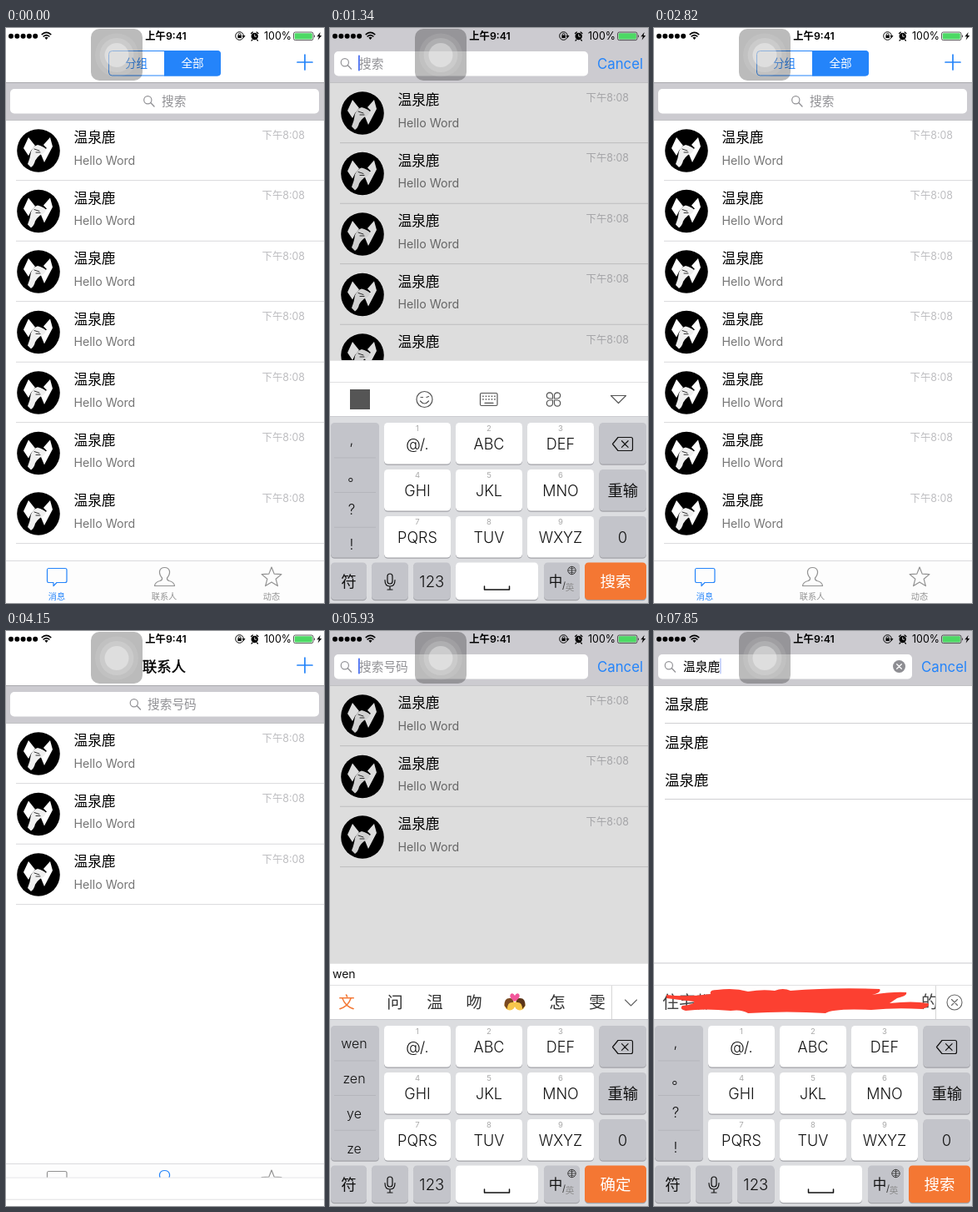
Animation of 382x689 px, one loop 8 s. Source, as an HTML page:

```html
<!DOCTYPE html>
<html lang="zh-CN">
<head>
<meta charset="utf-8">
<title>Search demo</title>
<style>
html, body { margin: 0; width: 100%; height: 100%; overflow: hidden; background: #fff; }
svg { display: block; width: 100vw; height: 100vh; font-family: Inter, "Noto Sans CJK SC", "Noto Sans CJK", sans-serif; }
</style>
</head>
<body>
<svg id="stage" viewBox="0 0 382 689"></svg>
<script>
const LOOP = 8000, TICK = LOOP / 54;
const BLUE = '#2484fa', ORANGE = '#f47733', BAR = '#cccbd0', HINT = '#929296';
const NAME = '温泉鹿';
const KEYBOARD_HEIGHT = 291;
const SLIDE = 296, SLIDE_DELAY = 34, HINT_SLIDE = 230;
const CONTACTS_AT = 3400, COMMIT_AT = 7250;

const searches = [
  { open: 473, close: 1367, caret: 950 },
  { open: 4116, close: Infinity, caret: 4600 }
];
const SIDE = ['wen', 'zen', 'ye', 'ze'];
const WORDS = ['文', '问', '温', '吻', '', '怎', '雯'];
const typing = [
  { at: 4880, pinyin: 'w', side: ['w', 'x', 'y', 'z'], words: ['我', '在', '要', '一', '下', '想', '这'] },
  { at: 5180, pinyin: 'we', side: ['ye', 'ze', 'xe', 'we'], words: ['也', '夜', '则', '叶', '业', '页', '野'] },
  { at: 5620, pinyin: 'wen', side: SIDE, words: WORDS },
  ...["wen'q", "wen'qu", "wen'qua", "wen'quan", "wen'quan'l", "wen'quan'lu"].map((pinyin, i) =>
    ({ at: 6360 + i * TICK, pinyin, side: SIDE, words: ['温', '文', '问', '吻', '闻', '怎', '雯'] }))
];

const clamp = v => Math.max(0, Math.min(1, v));
const mix = (a, b, p) => a + (b - a) * p;
const smooth = v => { v = clamp(v); return v * v * (3 - 2 * v); };
// Critically damped spring, as used by the system keyboard.
const spring = ms => { const x = Math.max(0, ms) * 0.01826; return 1 - (1 + x) * Math.exp(-x); };

const rect = (x, y, w, h, fill, r = 0, more = '') =>
  `<rect x="${x}" y="${y}" width="${w}" height="${h}" rx="${r}" fill="${fill}" ${more}/>`;
const circle = (x, y, r, fill, more = '') => `<circle cx="${x}" cy="${y}" r="${r}" fill="${fill}" ${more}/>`;
const fillPath = (d, fill) => `<path d="${d}" fill="${fill}"/>`;
const line = (d, color, width = 1) =>
  `<path d="${d}" fill="none" stroke="${color}" stroke-width="${width}" stroke-linecap="round" stroke-linejoin="round"/>`;
const text = (x, cy, str, size, fill = '#000', anchor = 'middle', weight = 400) =>
  `<text x="${x}" y="${cy + size * 0.36}" font-size="${size}" fill="${fill}" text-anchor="${anchor}" font-weight="${weight}">${str}</text>`;
const group = (x, y, body, more = '') => `<g transform="translate(${x} ${y})" ${more}>${body}</g>`;

function statusBar() {
  let s = '';
  for (let i = 0; i < 5; i++) s += circle(6 + i * 7.3, 9.8, 3, '#000');
  s += line('M43.2 7.6Q48.5 3.2 53.8 7.6M45.2 9.9Q48.5 7.2 51.8 9.9', '#000', 1.6) + fillPath('M46.4 11.6Q48.5 10 50.6 11.6L48.5 14Z', '#000');
  s += text(192, 9.6, '上午9:41', 12.3, '#000', 'middle', 600);
  s += circle(280.5, 9.5, 4.8, 'none', 'stroke="#000"') + rect(278.4, 8.6, 4.4, 3.4, '#000') + line('M279.2 8.5V7.2Q280.6 5.6 282 7.2V8.5', '#000', 0.8) + fillPath('M283.5 9h4l-2 3z', '#000');
  s += circle(298.7, 10, 4.2, '#000') + line('M294.5 6.6L296.3 5M302.9 6.6L301.1 5M295.8 14.2L295 15M301.6 14.2L302.4 15', '#000', 1.3) + line('M298.7 7.8V10.2H300.6', '#fff', 0.8);
  s += text(326.5, 9.8, '100%', 12.4);
  s += rect(345.5, 5, 23.5, 9.6, 'none', 2, 'stroke="#333" stroke-width=".8"') + rect(346.7, 6.2, 21.1, 7.2, '#4cd964', 1) + fillPath('M370 8Q372 9.8 370 11.6Z', '#333');
  return s + fillPath('M377.6 5L373.4 10.3H375.9L374.6 14.5L379.2 8.9H376.6Z', '#000');
}

function assistiveButton() {
  return rect(102, 1, 62, 62, 'rgba(0,0,0,.265)', 10) +
    [[26, .09], [20.5, .16], [14.5, .36]].map(([r, a]) => circle(133, 32.5, r, `rgba(255,255,255,${a})`)).join('');
}

function navBar(contacts, shift, alpha) {
  let s = rect(0, -10, 382, 76, '#fff') + rect(0, 65, 382, 1, '#a9a9ad');
  if (contacts) s += `<g stroke="#000" stroke-width=".4">${text(190, 42.5, '联系人', 17.3)}</g>`;
  else s += rect(123.5, 27.5, 134, 29.5, '#fff', 4, `stroke="${BLUE}"`) +
    fillPath('M190 27H254Q258 27 258 31V53.5Q258 57.5 254 57.5H190Z', BLUE) +
    text(156.5, 42.3, '分组', 13.6, BLUE) + text(224, 42.3, '全部', 13.6, '#fff');
  s += line('M350 41H368M359 32V50', BLUE, 1.7);
  return group(0, -shift, s, `opacity="${alpha}"`);
}

function avatar() {
  return circle(0, 0, 25.8, '#000') +
    fillPath('M-18 -3L-12 -16L-4 -6L-9 0L-12 6Z', '#fff') +
    fillPath('M14 -16L17 -5L7 14L2 2L10 -3L6 -7Z', '#fff') +
    fillPath('M-9 1Q-6 -6 -1 -7Q6 -5 9 -2Q8 3 2 5Q-2 8 -4 12Q-5 17 -9 20L-13 16Q-10 9 -9 1Z', '#f0f0f0') +
    line('M-5 -2L1 0M-3 2L2 2', '#333', 1);
}

function messageRows(count, shift) {
  let s = '';
  for (let i = 0; i < count; i++) {
    s += group(0, 110.5 + i * 72.5 - shift,
      group(39, 36.5, avatar()) + text(81.5, 20.7, NAME, 16.7, '#000', 'start') +
      text(81.5, 48, 'Hello Word', 14.2, '#757575', 'start') +
      text(359, 17.8, '下午8:08', 12.4, '#bdbdc0', 'end') +
      (i === 5 ? '' : rect(12, 71.8, 370, 0.8, '#cfcfd2')));
  }
  return s;
}

const resultRows = () => rect(0, 66, 382, 332, '#fff') + rect(0, 397, 382, 1, '#e2e2e4') +
  [0, 1, 2].map(i => text(13, 88 + i * 45.5, NAME, 17.5, '#000', 'start') +
    (i === 1 ? '' : rect(13, 110 + i * 45.5, 369, 1, '#d0d0d3'))).join('');

function searchBar(p, hint, shift, contacts, committed, caret) {
  const width = mix(371, 305, p), y = 87.5 - shift;
  // At rest the hint sits in the middle of the field; active, it sits at the left.
  const middle = 5 + width / 2;
  const iconX = mix(middle - (contacts ? 35.5 : 19), 19, hint), textX = mix(middle - (contacts ? 20.5 : 3.5), 35, hint);
  let s = rect(0, 0, 382, 110.5 - shift, BAR) + rect(0, 110 - shift, 382, 0.8, '#b9b9bd');
  s += rect(5, y - 14.5, width, 29.5, '#fff', 5);
  s += circle(iconX - 1.2, y - 1.3, 4.6, 'none', `stroke="${HINT}" stroke-width="1.2"`) + line(`M${iconX + 2.2} ${y + 2.1}L${iconX + 6.5} ${y + 6.4}`, HINT, 1.4);
  s += committed ? text(35, y, NAME, 14.7, '#000', 'start')
    : text(textX, y, contacts ? '搜索号码' : '搜索', 14.7, HINT, 'start');
  if (committed) s += circle(294.5, y, 7.5, '#8e8e93') + line(`M291.7 ${y - 2.8}l5.6 5.6m0 -5.6l-5.6 5.6`, '#fff', 1.3);
  if (caret) s += rect(committed ? 79 : 34, y - 10, 1.8, 19, '#4a6ff0', 0.8, `opacity="${caret}"`);
  return s + text(mix(394, 321, p), y, 'Cancel', 16.8, BLUE, 'start');
}

function tabBar(contacts) {
  const tint = i => i === (contacts ? 1 : 0) ? BLUE : '#929292';
  let star = '';
  for (let i = 0; i < 10; i++) {
    const a = i * Math.PI / 5 - Math.PI / 2, r = i % 2 ? 5.4 : 12.5;
    star += `${i ? 'L' : 'M'}${319 + r * Math.cos(a)} ${658.5 + r * Math.sin(a)}`;
  }
  return rect(0, 638, 382, 51, '#fdfdfd') + rect(0, 638, 382, 0.8, '#d4d4d6') +
    line('M51 647.5H71Q73 647.5 73 649.5V662.5Q73 664.5 71 664.5H61L57 668.5V664.5H51Q49.5 664.5 49.5 662.5V649.5Q49.5 647.5 51 647.5Z', tint(0), 1.2) +
    line('M187.5 659Q184 655 184.5 651Q185.5 646.5 190.5 646.5Q195.5 646.5 196.5 651Q197 655 193.5 659Q193 661.5 196 662.5Q202 664 202.5 668.5H178.5Q179 664 185 662.5Q188 661.5 187.5 659Z', tint(1), 1.2) +
    line(star + 'Z', tint(2), 1.2) +
    ['消息', '联系人', '动态'].map((label, i) => text([61, 190, 319][i], 681.5, label, 10.2, tint(i))).join('');
}

function toolbar() {
  const ink = '#555';
  let s = rect(24, 433, 24, 24, ink);
  s += circle(113.5, 445, 9.5, 'none', `stroke="${ink}" stroke-width="1.2"`) + line('M108.5 447Q113.5 453 118.5 447M109 442.5H111.5M116 442.5L118.5 441.5', ink, 1.2);
  s += rect(180.5, 437.5, 20.5, 15, 'none', 1.5, `stroke="${ink}" stroke-width="1.2"`) + line('M186 449.3H196', ink, 1.3);
  for (let i = 0; i < 10; i++) s += rect(183.2 + i % 5 * 3.5, 440.6 + (i > 4 ? 3.6 : 0), 1.5, 1.5, ink);
  for (const a of [0, 90, 180, 270])
    s += `<g transform="rotate(${a} 268.5 445)">${line('M267.5 444H263.5Q260.3 443.6 260.3 440.3Q260.6 437 263.8 436.8Q267.2 437 267.5 440.3Z', ink, 1.2)}</g>`;
  return s + line('M337.5 440.5H355.5L346.5 449.5Z', ink, 1.2);
}

const kissIcon = () => group(222, 445,
  circle(-6, 3, 6.5, '#f7c64b') + circle(6, 3, 6.5, '#f7c64b') +
  fillPath('M-12.5 4Q-13 -6 -5 -5Q-1 -4 -2 0Q-9 -1 -9 8Z', '#7a4a22') +
  fillPath('M12.5 4Q13 -6 5 -5Q1 -4 2 0Q9 -1 9 8Z', '#5b3519') +
  fillPath('M0 -1Q-8 -6 -5 -10Q-2 -12 0 -8Q2 -12 5 -10Q8 -6 0 -1Z', '#f2569b'));

function candidates(stage) {
  return text(3, 411, stage.pinyin, 14, '#111', 'start') +
    stage.words.map((word, i) => word ? text([20, 78, 126, 173, 222, 273, 321][i], 445, word, 19.5, i ? '#333' : ORANGE) : kissIcon()).join('') +
    rect(338, 425, 0.8, 40, '#ccc') + line('M354.5 442L361.5 449L368.5 442', '#666', 1.1);
}

function suggestions() {
  return text(10, 445, '住宅都', 20, '#444', 'start') + text(331, 445, '的', 20, '#444') +
    rect(339, 425, 43, 40, '#fff') + rect(338, 425, 0.8, 40, '#ccc') +
    circle(361, 445, 9, 'none', 'stroke="#666" stroke-width="1.1"') + line('M357.5 441.5l7 7m0 -7l-7 7', '#666', 1.1) +
    fillPath('M15 436Q40 439 68 435Q66 430 76 430Q96 427 113 432Q130 429 145 431Q155 427 164 431Q215 427 271 429Q274 433 262 436Q286 432 303 433Q305 437 292 440L283 446Q310 443 329 446Q333 450 322 453Q290 451 261 454Q215 452 206 458Q160 455 113 458Q105 453 92 455Q60 452 38 455Q30 453 34 449Q50 447 48 444Q30 442 15 440Z', '#fc4031');
}

const key = (x, y, w, h, fill) => rect(x, y + 1.2, w, h, '#a2a3a8', 4.5) + rect(x, y, w, h, fill, 4.5);

function keypad(stage) {
  const grey = '#c3c4ca';
  let s = rect(0, 465, 382, 224, '#dcdde0') + rect(0, 465, 382, 0.8, '#c8c9cc');
  s += key(1, 473, 58, 161.5, grey);
  for (let i = 1; i < 4; i++) s += rect(5, 473 + i * 41.6, 50, 0.7, '#aeafb5');
  s += stage ? stage.side.map((label, i) => text(29, 494 + i * 42, label, 16, '#111', 'middle', 300)).join('')
    : [[',', 493], ['。', 537], ['?', 577], ['!', 619]].map(([c, y]) => text(c === '。' ? 30 : 26, y, c, 17, '#111', 'middle', 300)).join('');
  ['@/.', 'ABC', 'DEF', 'GHI', 'JKL', 'MNO', 'PQRS', 'TUV', 'WXYZ'].forEach((label, i) => {
    const x = 65 + i % 3 * 86, y = 473 + Math.floor(i / 3) * 56;
    s += key(x, y, 80, 49.5, '#fff') + text(x + 40, y + 6.5, i + 1, 9.5, '#aaa') + text(x + 40, y + 25.8, label, 18, '#111', 'middle', 300);
  });
  for (let i = 0; i < 3; i++) s += key(323.5, 473 + i * 56, 56.5, 49.5, grey);
  s += line('M339.5 498.5L346 490.5H361.5Q363.5 490.5 363.5 492.5V504.5Q363.5 506.5 361.5 506.5H346ZM350.5 494.7l7.6 7.6m0 -7.6l-7.6 7.6', '#111', 1.2);
  s += text(351.7, 554, '重输', 18.3, '#111', 'middle', 300) + text(351.5, 610, '0', 18.5, '#111', 'middle', 300);
  for (const [x, w, fill] of [[1, 43, grey], [50, 44, grey], [100, 44.5, grey], [151, 99, '#fff'], [257, 43, grey], [306, 74, ORANGE]])
    s += key(x, 640.5, w, 44.5, fill);
  s += text(22.5, 663, '符', 18.5, '#111', 'middle', 300) + text(122.3, 663, '123', 18.5, '#111', 'middle', 300);
  s += rect(69, 654, 6, 12, 'none', 3, 'stroke="#111" stroke-width="1.2"') + line('M66 661.5Q66 669 72 669Q78 669 78 661.5M72 669V673M69 673H75', '#111', 1.2);
  s += line('M185.5 669V673H215.5V669', '#111', 1.5);
  s += text(271, 663, '中', 16.5, '#111', 'middle', 300) + text(281, 668, '/', 11, '#333') + text(288, 670.5, '英', 10.5, '#888');
  s += circle(290.5, 650, 4.7, 'none', 'stroke="#222" stroke-width=".8"') + line('M286 650H295M290.5 645.5V654.5M287.5 647Q290.5 649 293.5 647M287.5 653Q290.5 651 293.5 653', '#222', 0.7);
  return s + text(343, 663, stage ? '确定' : '搜索', 18.5, '#fff');
}

function keyboard(stage, committed) {
  return rect(0, 398, 382, 67, '#fff') + rect(0, 398, 382, 0.6, '#d6d6d8') + rect(0, 424, 382, 0.8, '#d9d9db') +
    (committed ? suggestions() : stage ? candidates(stage) : toolbar()) + keypad(stage);
}

function scene(t) {
  const contacts = t >= CONTACTS_AT, search = searches[contacts ? 1 : 0];
  const closing = t >= search.close, committed = t >= COMMIT_AT;
  const since = closing ? t - search.close : t - search.open;
  const active = (progress) => closing ? 1 - progress : progress;
  const slideTime = closing ? since : since - SLIDE_DELAY;
  const p = active(smooth(slideTime / SLIDE)), hint = active(smooth(slideTime / HINT_SLIDE));
  const drop = KEYBOARD_HEIGHT * (1 - active(spring(since))), shift = 45 * p;
  const stage = committed ? null : typing.filter(s => t >= s.at).pop();

  const blink = (t - (committed ? COMMIT_AT : search.caret)) % 1000;
  const caret = t < search.caret || closing ? 0 : clamp((650 - blink) / 150);

  return rect(0, 0, 382, 689, '#fff') +
    (committed ? resultRows() : messageRows(contacts ? 3 : 7, shift) + rect(0, 110.5 - shift, 382, 600, '#000', 0, `opacity="${0.135 * p}"`)) +
    searchBar(p, hint, shift, contacts, committed, caret) +
    navBar(contacts, shift, clamp(1.1 - 1.4 * p)) +
    tabBar(contacts) +
    (drop < KEYBOARD_HEIGHT - 0.5 ? group(0, drop, keyboard(stage, committed)) : '') +
    statusBar() + assistiveButton();
}

const stageEl = document.getElementById('stage');
let shown = -1;
function update(now) {
  const tick = Math.floor((now % LOOP + 6) / TICK) % 54;
  if (tick !== shown) {
    shown = tick;
    stageEl.innerHTML = scene(tick * TICK);
  }
  requestAnimationFrame(update);
}
update(0);
</script>
</body>
</html>
```
